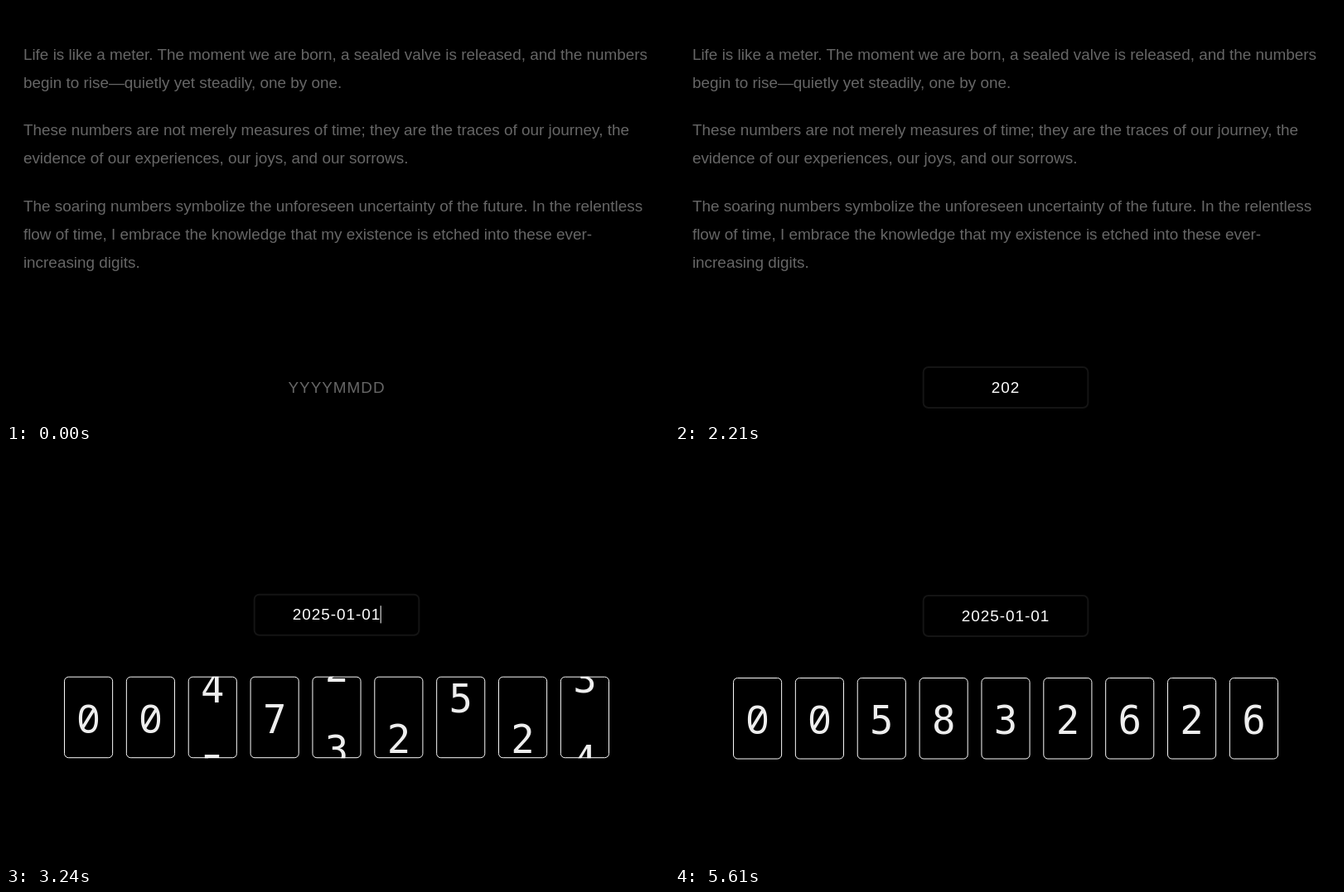
An HTML page with a canvas that plays this animation: 800 by 501 pixels, repeating every 5880 ms.

```html
<!DOCTYPE html>
<html lang="en">
<head>
<meta charset="utf-8">
<title>Life meter</title>
<style>
  html, body { margin: 0; width: 100%; height: 100%; overflow: hidden; background: #000; }
  canvas { display: block; }
</style>
</head>
<body>
<canvas id="stage" width="800" height="501"></canvas>
<script>
const ctx = document.getElementById('stage').getContext('2d');
const LOOP = 5880, FOCUS = 570, START = 3030;
const UNIT = 0.985;                      // page scale: one CSS pixel on this stage
const CENTER = 399;
const SANS = `${19.2 * UNIT}px "Liberation Sans", Arial, sans-serif`;
const MONO = `${48 * UNIT}px "DejaVu Sans Mono", monospace`;
const SLASHED = `${49 * UNIT}px "Noto Sans Mono", monospace`;

const PARAGRAPHS = [
  ['Life is like a meter. The moment we are born, a sealed valve is released, and the numbers',
   'begin to rise—quietly yet steadily, one by one.'],
  ['These numbers are not merely measures of time; they are the traces of our journey, the',
   'evidence of our experiences, our joys, and our sorrows.'],
  ['The soaring numbers symbolize the unforeseen uncertainty of the future. In the relentless',
   'flow of time, I embrace the knowledge that my existence is etched into these ever-',
   'increasing digits.'],
];
const DATE = '2025-01-01';
// [time, characters shown]; hyphens are inserted along with the next digit
const KEYS = [[1460, 1], [1550, 2], [1700, 3], [2390, 4], [2580, 6], [2730, 7], [2880, 9], [START, 10]];
const SECONDS = 5832624;

function setText(font, color, spacing = 0, align = 'left') {
  ctx.font = font;
  ctx.fillStyle = color;
  ctx.letterSpacing = spacing + 'px';
  ctx.textAlign = align;
  ctx.fontKerning = 'normal';
}

function outline(x, y, w, h, line, color, radius) {
  ctx.beginPath();
  ctx.roundRect(x + line / 2, y + line / 2, w - line, h - line, radius);
  ctx.strokeStyle = color;
  ctx.lineWidth = line;
  ctx.stroke();
}

function drawParagraphs() {
  setText(SANS, '#666');
  let y = 64.7;
  for (const lines of PARAGRAPHS) {
    for (const line of lines) {
      ctx.fillText(line, 20.9, y);
      y += 34.56 * UNIT;
    }
    y += 24 * UNIT;
  }
}

function drawInput(t, top) {
  const fade = Math.min(1, Math.max(0, (t - FOCUS) / 300));
  if (fade) outline(298.7, top, 200.6, 51, 2 * UNIT, `rgba(20,20,20,${fade})`, 6);

  const key = KEYS.findLast(([time]) => time <= t);
  const typed = key ? DATE.slice(0, key[1]) : '';
  const shown = typed || 'YYYYMMDD';
  setText(SANS, typed ? '#fff' : '#666', UNIT);
  ctx.fillText(shown, CENTER - ctx.measureText(shown).width / 2, top + 31.8);

  const since = t - (key ? key[0] : FOCUS);
  if (since >= 0 && since % 1000 < 490) {
    const end = typed ? ctx.measureText(typed).width / 2 - 0.6 : 0;
    ctx.fillStyle = '#fff';
    ctx.fillRect(CENTER + end, top + 14.5, UNIT, 21.2);
  }
}

function drawMeter(t, top, tick, progress) {
  const w = 60 * UNIT, h = 100 * UNIT, pitch = 76 * UNIT;
  const digits = n => String(n).padStart(9, '0');
  const to = digits(SECONDS + tick);
  const from = digits(tick ? SECONDS + tick - 1 : 0);
  for (let i = 0; i < 9; i++) {
    const x = CENTER - (8 * pitch + w) / 2 + i * pitch;
    const position = +from[i] + (to[i] - from[i]) * progress;
    ctx.save();
    ctx.beginPath();
    ctx.roundRect(x, top, w, h, 5);
    ctx.clip();
    const first = Math.floor(position);
    for (let d = first; d <= Math.min(9, first + 1); d++) {
      setText(d ? MONO : SLASHED, '#eee', 0, 'center');
      ctx.fillText(d, x + w / 2, top + 68 + (d - position) * h);
    }
    ctx.restore();
    outline(x, top, w, h, UNIT, '#fff', 5);
  }
}

function drawPointer(t) {
  if (t < 240 || t >= 850) return;
  const rise = Math.min(1, (t - 225) / 320);
  const fall = Math.max(0, (t - 570) / 250);
  const x = 447 - 5 * rise - 2 * fall;
  const y = 503 - 43 * Math.sin(rise * Math.PI / 2) + 17 * fall * fall;
  ctx.strokeStyle = '#fff';
  ctx.fillStyle = '#000';
  ctx.lineWidth = 1;
  ctx.beginPath();
  if (y > 486) {
    const arrow = [[0, 0], [0, 15], [3.5, 12], [6, 17.5], [8, 16.5], [5.8, 11.2], [10.5, 11]];
    for (const [dx, dy] of arrow) ctx.lineTo(x + dx, y + dy);
    ctx.closePath();
    ctx.fill();
  } else {
    for (const s of [-1, 1]) {
      ctx.moveTo(x - 3, y + 8.5 * s);
      ctx.quadraticCurveTo(x, y + 8.5 * s, x, y + 6 * s);
      ctx.quadraticCurveTo(x, y + 8.5 * s, x + 3, y + 8.5 * s);
    }
    ctx.moveTo(x, y - 6);
    ctx.lineTo(x, y + 6);
  }
  ctx.stroke();
}

function draw(t) {
  ctx.fillStyle = '#000';
  ctx.fillRect(0, 0, 800, 501);
  if (t < START) {
    drawParagraphs();
    drawInput(t, 435);
    drawPointer(t);
    return;
  }
  const tick = Math.floor((t - START) / 1000);
  const elapsed = (t - START) % 1000;
  const progress = 1 - (1 - Math.min(1, (elapsed + 40) / 340)) ** 1.55;
  const top = 176 - (tick ? 0 : 10.5 * (1 - progress));
  drawInput(t, top);
  drawMeter(t, top + 100, tick, progress);
}

function frame() {
  draw(performance.now() % LOOP);
  requestAnimationFrame(frame);
}
frame();
</script>
</body>
</html>
```
